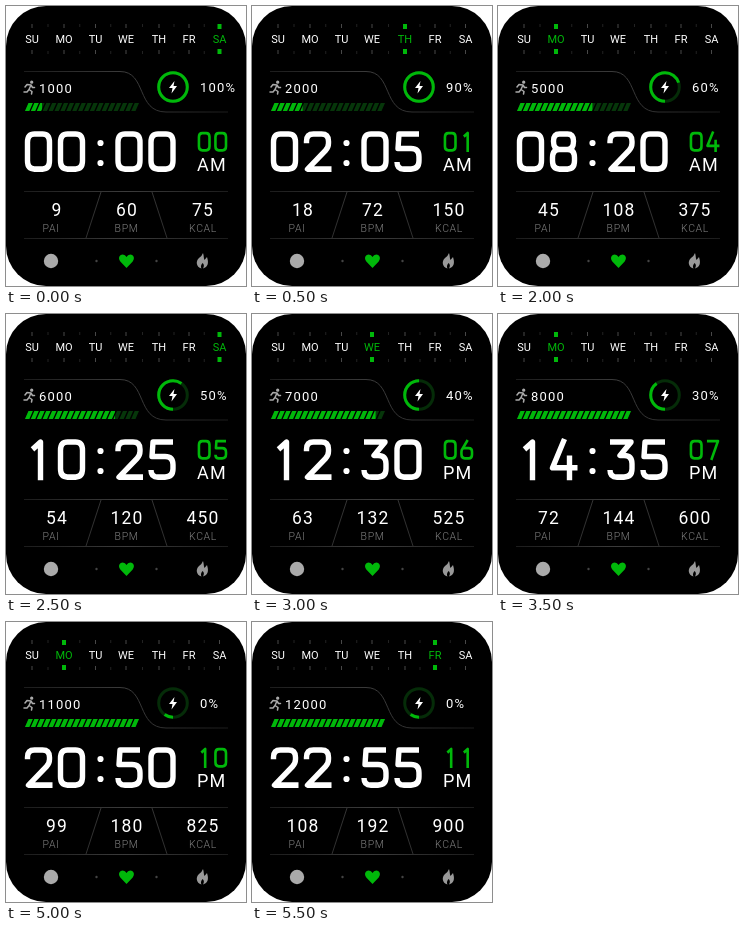
An HTML page for the animation above (6 s loop, 240x280 px).

```html
<!DOCTYPE html>
<html lang="en">
<head>
<meta charset="utf-8">
<title>Watch face</title>
<style>
  html, body { margin: 0; width: 100%; height: 100%; overflow: hidden; background: #fff; }
  svg { display: block; width: 100vw; height: 100vh; font-family: Roboto, "Open Sans", sans-serif; }
  text { fill: #fff; }
  .days text { font-size: 11px; text-anchor: middle; }
  .small { font-size: 13px; letter-spacing: 1.2px; }
  .value { font-size: 17.5px; letter-spacing: 1.1px; text-anchor: middle; }
  .label { font-size: 10.5px; letter-spacing: .6px; text-anchor: middle; fill: #808080; font-weight: 300; }
  .line { fill: none; stroke: url(#fade); }
  .glyph { fill: none; stroke-width: 5.4; stroke-linejoin: round; }
  .on, .days .on { fill: #00b80a; }
</style>
</head>
<body>
<svg viewBox="0 0 240 280">
  <defs>
    <clipPath id="done"><rect id="fill" x="18" y="95" height="12"/></clipPath>
    <linearGradient id="fade">
      <stop offset="0" stop-color="#1c1c1c"/>
      <stop offset=".5" stop-color="#3c3c3c"/>
      <stop offset="1" stop-color="#1c1c1c"/>
    </linearGradient>
  </defs>
  <rect width="240" height="280" rx="40"/>

  <g class="days" id="days"></g>

  <path class="line" d="M18 65.5H114C141 65.5 130 106 160 106H222"/>
  <g fill="none" stroke="#aaa" stroke-width="1.5" stroke-linecap="round" stroke-linejoin="round">
    <path d="M19 81L21 78.5L25 79L23 83.5L26 85.5L25.500 88M23 83.5L21 86H18M25 79L26.5 81.5H28.5"/>
    <circle cx="25.7" cy="76.2" r=".9" fill="#aaa"/>
  </g>
  <text class="small" id="steps" x="33" y="87"></text>
  <path class="bar" fill="#06360a"/>
  <path class="bar on" clip-path="url(#done)"/>

  <g fill="none" stroke-width="3" transform="rotate(90 167 81)">
    <circle cx="167" cy="81" r="14.3" stroke="#052c08"/>
    <circle id="ring" cx="167" cy="81" r="14.3" stroke="#00b80a" pathLength="100"/>
  </g>
  <path fill="#fff" d="M168.5 75L163 82H166.5L165.5 87.5L171 80H167.5Z"/>
  <text class="small" id="power" x="194" y="86"></text>

  <g id="clock" stroke="#fff"></g>
  <circle cx="94.500" cy="137" r="3.1" fill="#fff"/>
  <circle cx="94.500" cy="157" r="3.1" fill="#fff"/>
  <g id="secs" stroke="#00b80a"></g>
  <text id="half" x="191" y="165" font-size="18" letter-spacing="1.2"></text>

  <path class="line" d="M18 185.5H222M18 232.5H222M95 186L80 232M146 186L161 232"/>
  <text class="value" id="pai" x="51" y="210"></text>
  <text class="value" id="bpm" x="121" y="210"></text>
  <text class="value" id="kcal" x="197" y="210"></text>
  <text class="label" x="45" y="225.5">PAI</text>
  <text class="label" x="120.5" y="225.5">BPM</text>
  <text class="label" x="197" y="225.5">KCAL</text>

  <circle cx="45" cy="255" r="7.2" fill="#aaa"/>
  <circle cx="90.5" cy="255" r="1.2" fill="#444"/>
  <circle cx="150.5" cy="255" r="1.2" fill="#444"/>
  <path class="on" d="M120.5 262L114.3 255.5C111.5 251.5 114 248.5 116.7 248.5Q119.3 248.5 120.5 251Q121.7 248.5 124.3 248.5C127 248.5 129.5 251.5 126.7 255.5Z"/>
  <path fill="#999" d="M197 247C198 250 197.500 252 198.500 254L201 251C203 257 202 261 197 262.500Q199 259 196.500 257Q194 260 195.500 262.500C190 261 189.500 255 193 252Q196 250 197 247Z"/>
</svg>
<script>
const $ = id => document.getElementById(id);

// Digit strokes in a 28 by 40 box
const DIGITS = [
  'M10 3H18Q25 3 25 11V29Q25 37 18 37H10Q3 37 3 29V11Q3 3 10 3Z',
  'M8 10L16 3V40',
  'M3 12V10Q3 3 10 3H18Q25 3 25 10V12Q25 16 22 19L4 37H28',
  'M3 3H24L13 16H17Q25 16 25 24V29Q25 37 17 37H10Q3 37 3 30',
  'M15 0L3 28H28M20 16V40',
  'M25 3H5L4 17H17Q25 17 25 25V29Q25 37 17 37H10Q3 37 3 30',
  'M16 1L4 20Q3 22 3 25V29Q3 37 10 37H18Q25 37 25 30V24Q25 17 18 17H7',
  'M2 3H25L11 40',
  'M10 3H18Q24 3 24 10Q24 18 18 18H10Q4 18 4 10Q4 3 10 3ZM10 18H18Q25 18 25 26V29Q25 37 18 37H10Q3 37 3 29V26Q3 18 10 18Z',
  'M12 39L24 20Q25 18 25 15V11Q25 3 18 3H10Q3 3 3 10V16Q3 23 10 23H21'
];
const NAMES = ['SU', 'MO', 'TU', 'WE', 'TH', 'FR', 'SA'];
const DAY_X = [26, 58, 89.5, 120, 153, 183, 213.5];

const two = n => String(n).padStart(2, '0');
const glyphs = (text, xs, y, sx, sy) => [...text].map((c, i) =>
  `<path class="glyph" transform="translate(${xs[i]} ${y}) scale(${sx} ${sy})" d="${DIGITS[c]}"/>`).join('');
const ticks = (x, w, h, attr) => [18, 48 - h].map(y =>
  `<rect x="${x - w / 2}" y="${y}" width="${w}" height="${h}" ${attr}/>`).join('');

let stripes = '';
for (let i = 0; i < 19; i++) stripes += `M${19 + 5.9 * i} 105l3.5 -8h4.3l-3.5 8z`;
document.querySelectorAll('.bar').forEach(p => p.setAttribute('d', stripes));

function drawDays(today) {
  $('days').innerHTML = NAMES.map((name, i) => {
    const x = DAY_X[i], on = i === today;
    const between = i < 6 ? ticks((x + DAY_X[i + 1]) / 2, 1, 3, 'fill="#222"') : '';
    return (on ? ticks(x, 4, 5, 'class="on"') : ticks(x, 1, 4, 'fill="#484848"')) + between +
      `<text x="${x}" y="37" ${on ? 'class="on"' : ''}>${name}</text>`;
  }).join('');
}

function draw(n) {
  const power = Math.max(0, 100 - 10 * n);
  // Each step moves on one month and two days
  drawDays(new Date(2022, n, 1 + 2 * n).getDay());
  $('steps').textContent = 1000 * (n + 1);
  $('fill').setAttribute('width', Math.min(116, 18 + 14.6 * n));
  $('power').textContent = power + '%';
  $('ring').setAttribute('stroke-dasharray', `${Math.min(100, power + 10)} 100`);
  $('clock').innerHTML = glyphs(two(2 * n) + two(5 * n), [18.5, 51.5, 109, 142], 125, 1, 1.03);
  $('secs').innerHTML = glyphs(two(n), [191.5, 208], 125.5, .48, .51);
  $('half').textContent = n < 6 ? 'AM' : 'PM';
  $('pai').textContent = 9 * (n + 1);
  $('bpm').textContent = 60 + 12 * n;
  $('kcal').textContent = 75 * (n + 1);
}

let shown = -1;
function tick() {
  const n = Math.floor(performance.now() % 6000 / 500);
  if (n !== shown) draw(shown = n);
  requestAnimationFrame(tick);
}
tick();
</script>
</body>
</html>
```
